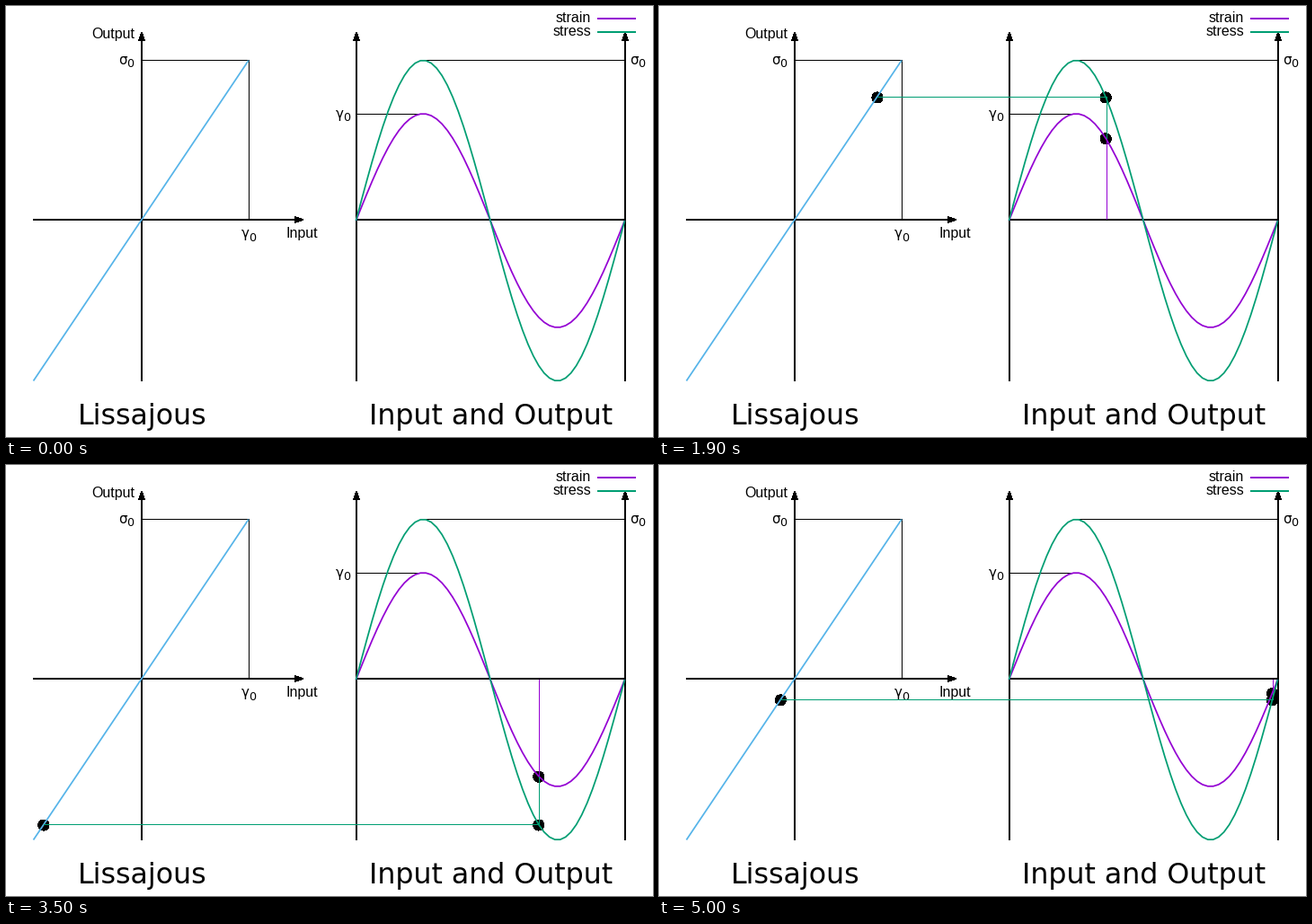
Animation, 720 px wide and 480 px high, one loop 5100 ms. Source, as a matplotlib script:

```python
import numpy as np
import matplotlib.pyplot as plt
from matplotlib.animation import FuncAnimation
from matplotlib.patches import Circle, Polygon

W, H, DPI = 720, 480, 80
PT = 72 / DPI          # points per pixel
STEPS = 50             # marker positions in one period

PURPLE, GREEN, BLUE = "#9400d3", "#009e73", "#56b4e9"

AXIS_Y, MID_Y = 238, 239
LEFT_X, LEFT_AMP = 150.5, 120
WAVE_X, PERIOD = 389.5, 299
STRESS, STRAIN = 178.5, 119

fig = plt.figure(figsize=(W / DPI, H / DPI), dpi=DPI, facecolor="white")
ax = fig.add_axes([0, 0, 1, 1])
ax.set_xlim(0, W)
ax.set_ylim(H, 0)
ax.axis("off")


def line(xs, ys, color="black", width=1, z=2, smooth=False):
    return ax.plot(xs, ys, color=color, lw=width * PT, zorder=z, antialiased=smooth,
                   solid_capstyle="butt", solid_joinstyle="round")[0]


def curve(xs, ys, color):
    line(xs, ys, color, 1.75, 5, smooth=True)


def text(x, y, s, size=16, font="Liberation Sans", align="left"):
    ax.text(x, y, s, fontsize=size * PT, family=font, ha=align, va="baseline", zorder=3)


def arrow(x0, y0, x1, y1):
    """Axis line ending in a slim filled head."""
    line([x0, x1], [y0, y1], width=2)
    d = np.array([x1 - x0, y1 - y0], float)
    d /= np.hypot(*d)
    side = np.array([-d[1], d[0]]) * 3.5
    tip = np.array([x1, y1])
    base = tip - d * 10
    ax.add_patch(Polygon([tip, base + side, base - side], fc="black", lw=0,
                         zorder=2, antialiased=False))


def symbol(x, y, letter):
    """Greek letter with a subscript zero."""
    text(x, y, letter, 15, "DejaVu Sans")
    text(x + 9, y + 3.5, "0", 12.8, "DejaVu Sans")


def dot():
    return ax.add_patch(Circle((0, 0), 6, fc="black", lw=0, zorder=4, antialiased=False))


# Axes
arrow(30, AXIS_Y, 331, AXIS_Y)
arrow(151, 418, 151, 29)
arrow(390, 418, 390, 29)
arrow(689, 418, 689, 29)
line([390, 689], [AXIS_Y, AXIS_Y], width=2)

# Amplitude guides
line([151, 270, 270], [60, 60, AXIS_Y])
line([464, 689], [60, 60])
line([390, 464], [120, 120])

# Curves
phase = np.linspace(0, 1, 51)
wave = np.sin(2 * np.pi * phase)
curve(WAVE_X + PERIOD * phase, MID_Y - STRAIN * wave, PURPLE)
curve(WAVE_X + PERIOD * phase, MID_Y - STRESS * wave, GREEN)
curve([LEFT_X - LEFT_AMP, LEFT_X + LEFT_AMP - 0.5],
      [MID_Y + STRESS, MID_Y - STRESS], BLUE)

# Labels and legend
text(143.4, 36, "Output", align="right")
text(311.6, 258, "Input")
for name, y, color in (("strain", 18, PURPLE), ("stress", 33, GREEN)):
    text(651, y, name, align="right")
    line([658, 701], [y - 4, y - 4], color, 2)
symbol(125.5, 65, "σ")
symbol(694, 65, "σ")
symbol(261.5, 258, "γ")
symbol(366.5, 125, "γ")
text(80, 466, "Lissajous", 31.6, "DejaVu Sans")
text(404, 466, "Input and Output", 31.6, "DejaVu Sans")

# Moving parts
dots = [dot() for _ in range(3)]
level = line([], [], GREEN, 1, 6)
lower = line([], [], PURPLE, 1, 6)
upper = line([], [], GREEN, 1, 6)
moving = dots + [level, lower, upper]


def draw(i):
    for part in moving:
        part.set_visible(i > 0)
    if i == 0:
        return moving
    p = (i - 1) / STEPS
    s = np.sin(2 * np.pi * p)
    x, left = WAVE_X + PERIOD * p, LEFT_X + LEFT_AMP * s
    y_stress, y_strain = MID_Y - STRESS * s, MID_Y - STRAIN * s

    places = ((left, y_stress), (x, y_stress), (x, y_strain))
    for d, (cx, cy) in zip(dots, places):
        d.center = (cx, cy + 0.5)

    # Thin lines sit on whole pixels
    col, row = np.floor(x + 1), np.floor(y_stress)
    start = AXIS_Y - 1 if s >= 0 else AXIS_Y + 1
    level.set_data([left, x], [row, row])
    lower.set_data([col, col], [start, y_strain])
    upper.set_data([col, col], [y_strain, y_stress])
    return moving


anim = FuncAnimation(fig, draw, frames=STEPS + 1, init_func=lambda: draw(0),
                     interval=100, repeat=True, repeat_delay=0, blit=False)
plt.show()
```
